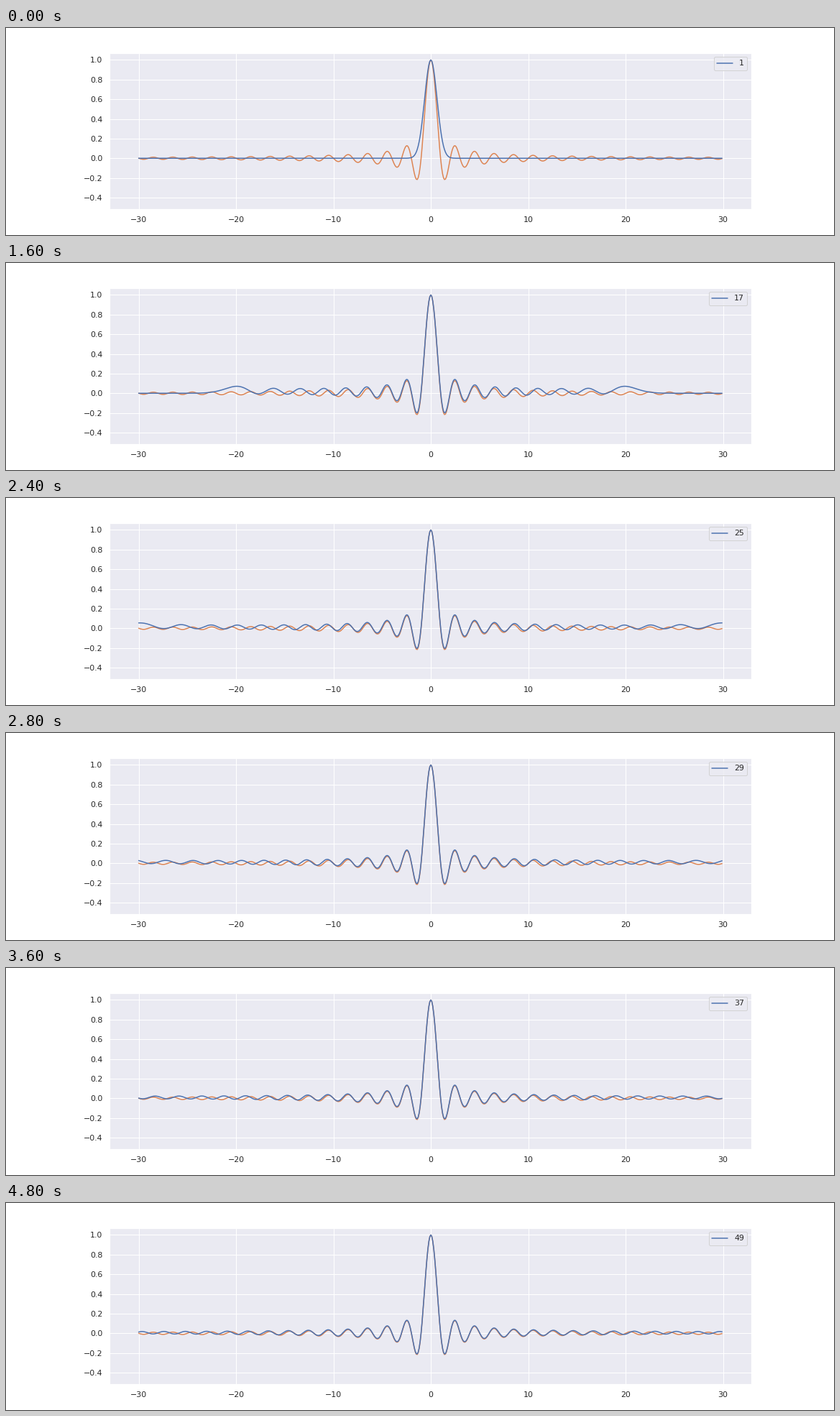
A matplotlib script for the animation above (4900 ms loop, 1152 px wide and 288 px high).

```python
import numpy as np
import matplotlib.pyplot as plt
from matplotlib.animation import FuncAnimation

FRAMES, STEP_MS = 49, 100
BLUE, ORANGE, INK = "#4C72B0", "#DD8452", "0.15"

plt.rcParams.update({
    "font.family": "DejaVu Sans",
    "text.color": INK,
    "axes.facecolor": "#EAEAF2",
    "axes.edgecolor": "white",
    "axes.linewidth": 1.25,
    "axes.axisbelow": True,
    "axes.grid": True,
    "grid.color": "white",
    "grid.linewidth": 1,
    "grid.linestyle": "-",
    "lines.linewidth": 1.5,
    "lines.solid_capstyle": "round",
    "patch.linewidth": 1,
    "legend.fontsize": 11,
})
for axis in ("xtick", "ytick"):
    plt.rcParams.update({
        f"{axis}.color": INK,
        f"{axis}.labelsize": 11,
        f"{axis}.major.size": 6,
        f"{axis}.major.width": 1.25,
        f"{axis}.major.pad": 3.5,
    })
plt.rcParams["xtick.bottom"] = plt.rcParams["ytick.left"] = False


def kernel(n, x):
    """Hermite kernel K_n(y, -y) / K_n(0, 0), scaled to approach sinc(x)."""
    y = np.append(x * np.pi / (2 * np.sqrt(2 * n)), 0.0)
    prev, cur = np.zeros_like(y), np.exp(-y**2 / 2)
    total = np.zeros_like(y)
    for k in range(n):
        total += (-1) ** k * cur**2
        prev, cur = cur, (np.sqrt(2 / (k + 1)) * y * cur
                          - np.sqrt(k / (k + 1)) * prev)
    return total[:-1] / total[-1]


def padded(low, high, margin=0.05):
    pad = margin * (high - low)
    return low - pad, high + pad


x = np.arange(-300, 300) / 10
curves = [kernel(n, x) for n in range(1, FRAMES + 1)]

fig, ax = plt.subplots(figsize=(16, 4), dpi=72, facecolor="white")
fig.subplots_adjust(left=0.125, right=0.9, bottom=0.125, top=0.88)
ax.plot(x, np.sinc(x), color=ORANGE)
line, = ax.plot(x, curves[0], color=BLUE)
ax.set_xlim(*padded(x[0], x[-1]))
ax.set_ylim(*padded(np.min(curves), np.max(curves)))


def update(i):
    line.set_ydata(curves[i])
    ax.legend([line], [str(i + 1)], loc="upper right")
    return line,


anim = FuncAnimation(fig, update, frames=FRAMES, interval=STEP_MS,
                     init_func=lambda: update(0), repeat=True, repeat_delay=0)
plt.show()
```
